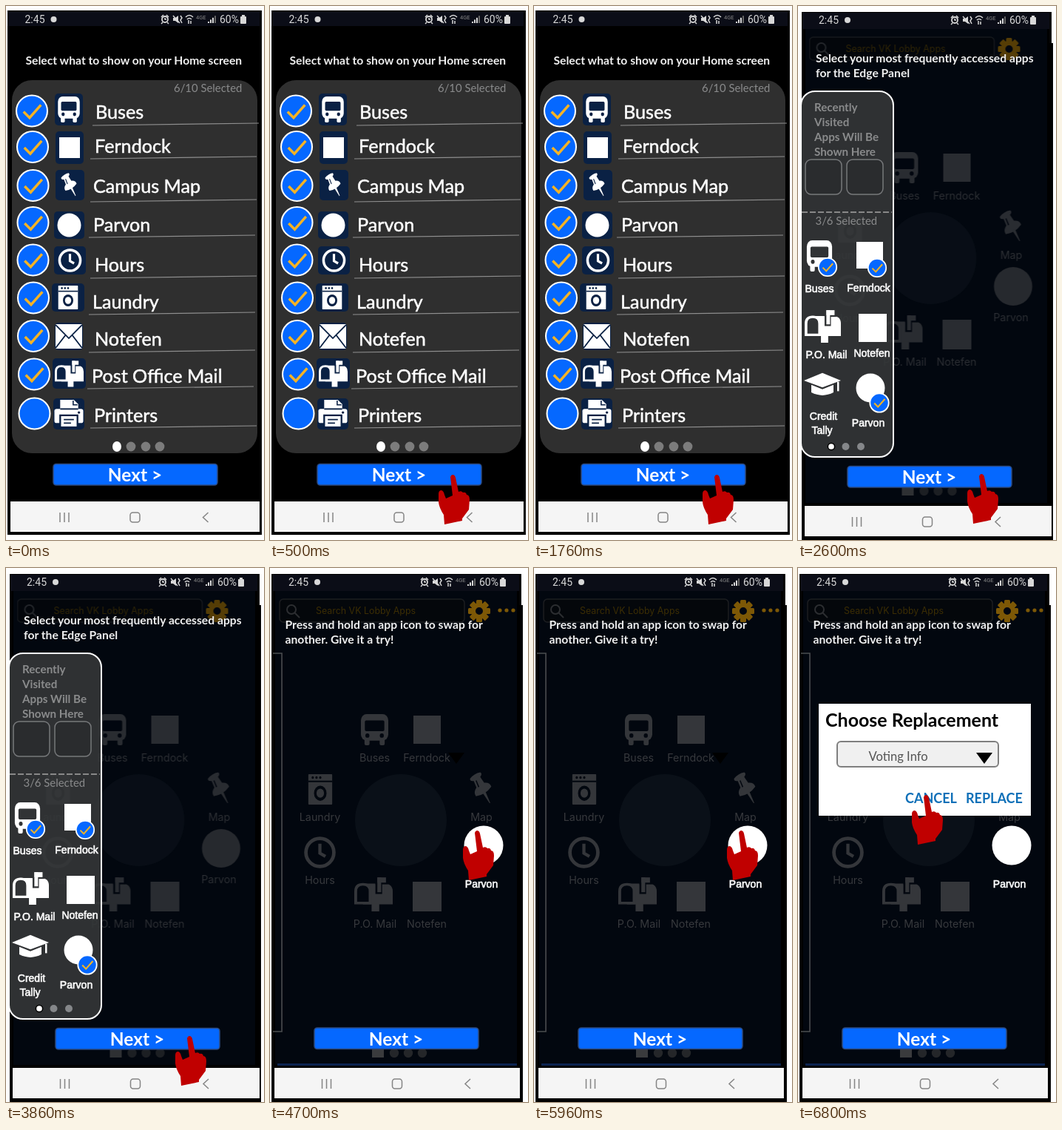
These frames come from a looping animation (349x720 px, 8 s). An HTML page:

```html
<!DOCTYPE html>
<html lang="en">
<head>
<meta charset="utf-8">
<title>App setup walkthrough</title>
<style>
html, body { margin: 0; width: 100%; height: 100%; overflow: hidden; background: #fff; }
svg { display: block; }
#stage { width: 349px; height: 720px; }
text { font-family: Lato, sans-serif; fill: #fff; }
.b { font-weight: 700; }
.row { font-size: 25.2px; stroke: #fff; stroke-width: .5px; }
.head { font-size: 15.7px; font-weight: 700; fill: #f0f0f0; }
.note { font-size: 15.2px; font-weight: 700; fill: #8a8b8c; }
.count { font-size: 14.9px; fill: #8a8b8c; }
.next { font-size: 24.5px; font-weight: 700; }
.bar { font: 14px Roboto, sans-serif; fill: #d8d8d8; }
.tag { font: 14px "Liberation Sans", Arial, sans-serif; stroke: #fff; stroke-width: .6px; }
.dim { font: 14.3px Inter, sans-serif; fill: #37393d; }
.find { font: 12.4px Inter, sans-serif; fill: #3b2d04; }
</style>
</head>
<body>
<svg id="stage" viewBox="0 0 349 720" xmlns="http://www.w3.org/2000/svg"></svg>
<script>
const BLUE = '#0568ff', NAVY = '#0a2144', GOLD = '#f5b324', NIGHT = '#02070f', TOP = '#0b0d17';

const rect = (x, y, w, h, fill, more = '') =>
  `<rect x="${x}" y="${y}" width="${w}" height="${h}" fill="${fill}" ${more}/>`;
const dot = (x, y, r, fill, more = '') =>
  `<circle cx="${x}" cy="${y}" r="${r}" fill="${fill}" ${more}/>`;
const line = (d, stroke, w, more = '') =>
  `<path d="${d}" fill="none" stroke="${stroke}" stroke-width="${w}" ${more}/>`;
const shape = (d, fill) => `<path d="${d}" fill="${fill}"/>`;
const text = (x, y, str, cls, more = '') => `<text x="${x}" y="${y}" class="${cls}" ${more}>${str}</text>`;
const mid = (x, y, str, cls) => text(x, y, str, cls, 'text-anchor="middle"');
const icon = (name, x, y, w, h) => `<use href="#${name}" x="${x}" y="${y}" width="${w}" height="${h}"/>`;
const tint = (ink, back, body) => `<g style="color:${ink};--cut:${back}">${body}</g>`;

const INK = 'currentColor', CUT = 'var(--cut)';
const icons = {
  bus: rect(1, 0, 38, 34, INK, 'rx="8"') + rect(6.5, 8, 27, 14, CUT, 'rx="2"') +
    dot(10, 27.5, 2.8, CUT) + dot(30, 27.5, 2.8, CUT) +
    rect(6, 31, 7, 9, INK, 'rx="2"') + rect(27, 31, 7, 9, INK, 'rx="2"'),
  pin: '<g transform="rotate(-30 20 20)">' +
    shape('M12 1Q20 -2 28 1Q30 4 25 6L26 15Q33 18 32 24Q20 29 8 24Q7 18 14 15L15 6Q10 4 12 1Z', INK) +
    line('M18 7L17 16', CUT, 1.5) + shape('M18 25H22L20.5 41H19.5Z', INK) + '</g>',
  clock: dot(20, 20, 17.6, 'none', `stroke="${INK}" stroke-width="4.4"`) + line('M20 9V21L27 25', INK, 4),
  washer: rect(1, 0, 38, 40, INK, 'rx="1"') + rect(1, 8.5, 38, 2, CUT) + dot(8, 4.4, 1.8, CUT) +
    dot(14, 4.4, 1.8, CUT) + dot(20, 4.4, 1.8, CUT) + dot(20, 25, 10, CUT) + dot(20, 25, 6, INK),
  mail: rect(0, 0, 40, 40, INK) + line('M0 1L20 23L40 1M0 39L15 18M40 39L25 18', CUT, 2),
  box: shape('M9 8H31Q40 8 40 17V32H9Z', INK) +
    shape('M1.5 31V17Q1.5 9 9 9T16.5 17V31Z', CUT) +
    line('M1.5 30.5V17Q1.5 9 9 9T16.5 17V30.5Z', INK, 3) +
    rect(22, 0, 13, 9, CUT) + rect(22, 7, 7, 13, CUT) + rect(24, 1, 4, 17, INK) +
    rect(24, 1, 9, 6, INK) + rect(18, 31, 8, 9, INK),
  printer: shape('M8 0H27L33 6V14H8Z', INK) + line('M26 1V7H32', CUT, 1.6) +
    rect(0, 13, 40, 20, INK, 'rx="3"') + line('M8 13H33', CUT, 2) + dot(34, 18, 1.8, CUT) +
    rect(8, 22, 24, 17, INK, `stroke="${CUT}" stroke-width="2.4"`) + line('M13 28H27M13 33H23', CUT, 2),
  cap: shape('M20 2L40 14L20 25L0 14Z', INK) + shape('M8 21L20 28L32 21V33Q20 42 8 33Z', INK) +
    line('M37 16V31', INK, 2),
  hand: shape('M17 4Q18 1 20 1Q23 1 24 5L28 24Q32 22 34 25Q38 24 39 28Q43 28 43 35L42 48L33 60V63' +
    'L9 68L8 55Q2 46 1 38L1 27Q1 22 5 22Q8 23 9 28L11 33L20 29Z', '#c00000')
};
const symbol = ([name, body]) => {
  const size = name === 'hand' ? '0 0 44 69' : '0 0 40 40';
  return `<symbol id="${name}" viewBox="${size}" preserveAspectRatio="none" overflow="visible">${body}</symbol>`;
};

function check(x, y, r, on = true) {
  return `<g transform="translate(${x} ${y}) scale(${r / 21})">` +
    dot(0, 0, 20.5, BLUE, `stroke="#fff" stroke-width="${r > 15 ? 2 : 3}"`) +
    (on ? line('M-11 1L-3 9L12 -8', GOLD, 3.4) : '') + '</g>';
}

// Clock at the left, signal icons at the right of the status bar
function status(x, right, y) {
  const c = '#d8d8d8';
  return text(x, y + 5, '2:45', 'bar') + dot(x + 39, y, 4, c) +
    `<g transform="translate(${right} ${y})">` +
    dot(-111, 0, 4, 'none', `stroke="${c}" stroke-width="1.8"`) +
    line('M-111 -2V0H-109M-116 -3L-113 -6M-106 -3L-109 -6M-114 4L-116 6M-108 4L-106 6', c, 1.5) +
    shape('M-100 -2H-97L-93 -5V5L-97 2H-100Z', c) + line('M-100 -5L-91 5M-90 -5L-88 -2L-90 1L-88 5', c, 1.5) +
    line('M-83 -3Q-78 -8 -73 -3M-81 0Q-78 -3 -75 0', c, 1.6) + line('M-79 6V1M-76 2V6', c, 1.5) +
    text(-69, 0, '4GE', 'bar', 'style="font-size:7.5px;fill:#888"') +
    [0, 1, 2, 3].map(i => rect(-53 + i * 3, 3 - i * 2.6, 2, 2 + i * 2.6, i < 3 ? c : '#666')).join('') +
    text(-37, 5, '60%', 'bar') + rect(-9, -4, 8, 10, c, 'rx="1"') + rect(-7, -6, 4, 2, c) + '</g>';
}

function nav(x, y, w, cx) {
  const m = y + 21.5, c = '#858585';
  return rect(x, y, w, 41, '#f5f5f5') +
    line([-101.5, -95.5, -89.5].map(d => `M${cx + d} ${m - 6.5}v13`).join(''), c, 1.5) +
    rect(cx - 6.5, m - 6.5, 13, 13, 'none', `rx="3.5" stroke="${c}" stroke-width="1.5"`) +
    line(`M${cx + 99} ${m - 6.5}l-7 6.5l7 6.5`, c, 1.5);
}

const next = (x, y) =>
  rect(x, y, 222, 28.5, BLUE, 'rx="4" stroke="#2c4a80" stroke-width="1.6"') + mid(x + 110.5, y + 23.5, 'Next &gt;', 'next');

// Label, check x/y, icon, icon box, text x/baseline, rule x/y
const rows = [
  ['Buses', 35, 141.5, 'bus', 66, 118, 38, 43, 121, 152, 117, 161],
  ['Ferndock', 36, 190, 'square', 67, 169, 38, 44, 120, 198, 114, 206],
  ['Campus Map', 36.5, 242, 'pin', 67, 221, 39, 41, 118, 252, 114, 264],
  ['Parvon', 36.5, 292, 'circle', 65, 277, 41, 37, 118, 304, 112, 312],
  ['Hours', 36.5, 342.5, 'clock', 65, 324, 43, 38, 120, 358, 114, 367],
  ['Laundry', 37, 393.5, 'washer', 62, 374, 44, 38, 117, 408, 112, 416],
  ['Notefen', 37, 445, 'mail', 66, 427, 38, 37, 120, 458, 112, 467],
  ['Post Office Mail', 38, 496.5, 'box', 63, 475, 45, 41, 116, 508, 110, 516],
  ['Printers', 38.5, 549.5, 'printer', 64, 529, 42, 42, 119, 561, 114, 569]
];
const sizes = {
  bus: [31, 35], pin: [29, 32], clock: [32, 32], washer: [28, 32],
  mail: [36, 33], box: [39, 36], printer: [39, 38]
};

function row([label, cx, cy, name, x, y, w, h, tx, ty, lx, ly], i) {
  const mx = x + w / 2, my = y + h / 2;
  const [iw, ih] = sizes[name] || [];
  const art = name === 'square' ? rect(mx - 14, my - 14, 28, 28, '#fff')
    : name === 'circle' ? dot(mx, my, 16, '#fff')
    : icon(name, mx - iw / 2, my - ih / 2, iw, ih);
  return check(cx, cy, 21.5, i < 8) + rect(x, y, w, h, NAVY, 'rx="5"') + tint('#fff', NAVY, art) +
    text(tx, ty, label, 'row') + line(`M${lx} ${ly}L${lx + 225} ${ly - 3}`, '#8f8f8f', 1.1);
}

const list = rect(2, 6, 344, 707, '#000') + rect(2, 7, 341, 20, TOP) + status(25.5, 326, 18) +
  text(26.5, 79, 'Select what to show on your Home screen', 'head') +
  rect(8, 100, 332, 503, '#2f2f2f', 'rx="27"') + text(227, 116, '6/10 Selected', 'count') +
  rows.map(row).join('') +
  [169, 189, 208].map(x => dot(x, 594, 6.4, '#7c7c7c')).join('') +
  '<ellipse cx="150" cy="594" rx="6" ry="7" fill="#fff"/>' +
  next(64, 617.5) + nav(6, 668, 337, 174.5);

const teeth = [...Array(8)].map((_, i) =>
  `<rect x="-4" y="-15" width="8" height="8" rx="1.5" transform="rotate(${i * 45})"/>`).join('');
const gear = color => `<g transform="translate(283 58)" fill="${color}">${teeth}` +
  dot(0, 0, 8, 'none', `stroke="${color}" stroke-width="6"`) + '</g>';

function home(gold) {
  const ink = '#34363a';
  return rect(13, 42, 250, 31, '#04070b', 'rx="5" stroke="#1c1e21" stroke-width="1.5"') +
    dot(29, 56, 6, 'none', 'stroke="#2c2e31" stroke-width="2"') + line('M33 60L40 67', '#2c2e31', 2) +
    text(62, 62, 'Search VK Lobby Apps', 'find') + gear(gold) +
    dot(177, 340, 62, '#0a1018') +
    tint(ink, NIGHT, icon('bus', 122, 197, 39, 42) + icon('washer', 51, 278, 34, 41) +
      icon('clock', 46, 362, 43, 43) + icon('pin', 267, 276, 40, 43) + icon('box', 114, 416, 52, 47) +
      rect(194, 199, 37, 38, ink) + rect(193, 423, 39, 40, ink)) +
    mid(141.5, 261, 'Buses', 'dim') + mid(212, 261, 'Ferndock', 'dim') + mid(67.5, 341, 'Laundry', 'dim') +
    mid(286, 341, 'Map', 'dim') + mid(67.5, 426, 'Hours', 'dim') + mid(142, 485, 'P.O. Mail', 'dim') +
    mid(212, 485, 'Notefen', 'dim') +
    rect(138, 645, 16, 15, '#3a3b3d') + [168, 187, 206].map(x => dot(x, 654, 6.2, '#242629')).join('');
}

const shell = (x, w) => rect(x, 8, w, 712, '#000') + rect(x + w, 50, 2, 670, '#000') +
  rect(x + 1, 9, w - 4, 22, TOP) + rect(x + 5, 31, w - 11, 639, NIGHT);

const panel = rect(4, 115, 125, 493, '#363839', 'rx="19" fill-opacity=".88" stroke="#fff" stroke-width="2"') +
  ['Recently', 'Visited', 'Apps Will Be', 'Shown Here'].map((s, i) => text(22, 142 + i * 20, s, 'note')).join('') +
  [10, 66].map(x => rect(x, 207, 49, 47, '#2a2c2e', 'rx="8" stroke="#77797b" stroke-width="1.5"')).join('') +
  line('M5 278H127', '#a5a5a5', 1.4, 'stroke-dasharray="8 3"') + text(23.5, 295, '3/6 Selected', 'count') +
  tint('#fff', '#313335', icon('bus', 11, 316, 36, 42) + icon('box', 9, 409, 49, 45) + icon('cap', 8, 493, 50, 34)) +
  rect(79, 318, 36, 36, '#fff') + rect(82, 415, 38, 38, '#fff') + dot(98, 515, 19.5, '#fff') +
  check(40, 352, 12.5) + check(107, 353, 12.5) + check(110, 535, 13) +
  mid(29, 386, 'Buses', 'tag') + mid(95.5, 385, 'Ferndock', 'tag') + mid(38.5, 475, 'P.O. Mail', 'tag') +
  mid(100, 473, 'Notefen', 'tag') + mid(34.5, 558, 'Credit', 'tag') + mid(32.5, 577, 'Tally', 'tag') +
  mid(95, 567, 'Parvon', 'tag') +
  dot(45, 594, 4.6, '#fff', 'stroke="#000" stroke-width="1.5"') + dot(64.5, 594, 5, '#85878a') + dot(85, 594, 5, '#85878a');

const pick = shell(5, 338) + status(28, 323, 19) +
  `<g transform="translate(2.5 0)" opacity=".8">${home('#6b4c04')}${dot(288.5, 378, 26, '#303236')}` +
  mid(285.5, 425, 'Parvon', 'dim') + '</g>' +
  text(24, 76, 'Select your most frequently accessed apps', 'head') + text(24, 96, 'for the Edge Panel', 'head') +
  panel + next(67, 620.5) + nav(9, 674, 334, 175);

const arrow = shape('M241 249H263L252 264Z', '#000');
const hold = shell(2, 338) + status(25, 320, 19) + home('#7d5806') +
  [311, 320, 329].map(x => dot(x, 57, 2.6, '#7d5806')).join('') +
  line('M4 115H16V625H4', '#4b4d4f', 1.6) + arrow +
  text(20.5, 82, 'Press and hold an app icon to swap for', 'head') + text(20.5, 102, 'another. Give it a try!', 'head') +
  dot(289, 374, 26.5, '#fff') + mid(286, 431, 'Parvon', 'tag') +
  rect(10, 668, 324, 3, '#0b2350') + next(60, 620) + nav(6, 674, 332, 172);

const dialog = rect(28, 183, 287, 151, '#fff') +
  text(37, 214, 'Choose Replacement', 'b', 'style="font-size:25px;fill:#000"') +
  rect(53, 234, 218, 34, '#f0f0f0', 'rx="5" stroke="#7f7f7f" stroke-width="2"') +
  text(95.5, 260, 'Voting Info', '', 'style="font-size:16.6px;fill:#555"') + arrow +
  text(145, 317, 'CANCEL', 'b', 'style="font-size:18px;fill:#0f70b8"') +
  text(227, 317, 'REPLACE', 'b', 'style="font-size:18px;fill:#0f70b8"');

const layers = { list, pick, hold, dialog };
const stage = document.getElementById('stage');
stage.innerHTML = `<defs>${Object.entries(icons).map(symbol).join('')}</defs>` +
  Object.entries(layers).map(([id, body]) => `<g id="layer-${id}">${body}</g>`).join('') +
  '<use id="pointer" href="#hand" width="44" height="69"/>';

// Start time, visible layers, pointer position
const steps = [
  [0, ['list'], null],
  [500, ['list'], [227, 631]],
  [2600, ['pick'], [228, 630]],
  [4700, ['hold'], [260, 353]],
  [6800, ['hold', 'dialog'], [153, 305]]
];
const LOOP = 8000;
const pointer = document.getElementById('pointer');
let shown = null;

function draw(step) {
  const [, visible, at] = step;
  for (const id in layers)
    document.getElementById('layer-' + id).style.display = visible.includes(id) ? '' : 'none';
  pointer.style.display = at ? '' : 'none';
  if (at) pointer.setAttribute('transform', `translate(${at})`);
  shown = step;
}

const start = performance.now();
function tick() {
  const t = (performance.now() - start) % LOOP;
  const step = steps.filter(s => s[0] <= t).pop();
  if (step !== shown) draw(step);
  requestAnimationFrame(tick);
}
tick();
</script>
</body>
</html>
```
